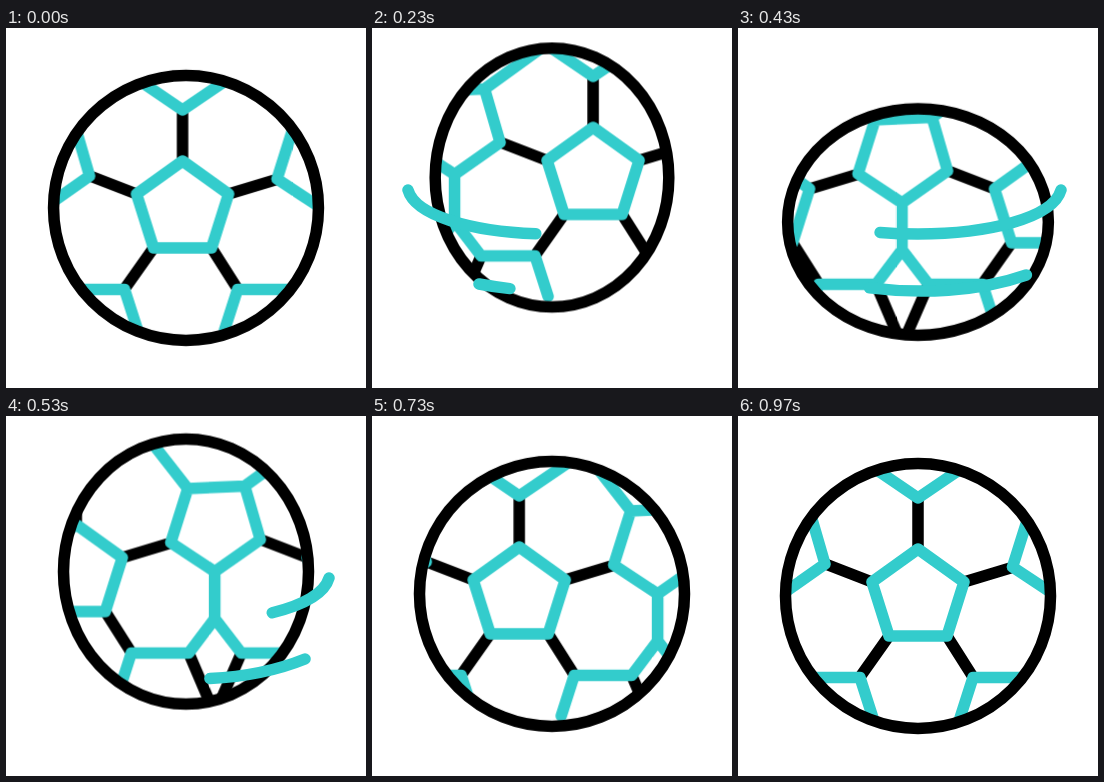
An HTML page without scripts for the animation above (1.67 s loop, 360 by 360 pixels).

```html
<!DOCTYPE html>
<html lang="en">
<head>
<meta charset="utf-8">
<title>Bouncing football</title>
<style>
  @property --head { syntax: "<length>"; inherits: false; initial-value: 0px; }
  @property --tail { syntax: "<length>"; inherits: false; initial-value: 0px; }

  :root { --loop: 1670ms; --lead: -5ms; --ease: cubic-bezier(.333, 0, .667, 1); }
  html, body { margin: 0; width: 100%; height: 100%; overflow: hidden; background: #fff; }
  svg { display: block; width: 100%; height: 100%; }

  path, .rim { fill: none; stroke-width: 11.5; stroke-linecap: round; stroke-linejoin: round; }
  .dark, .rim { stroke: #000; }
  .teal, .swoosh { stroke: #3cc; }

  .hop { animation: hop var(--loop) var(--ease) var(--lead) infinite; }
  .roll { animation: roll var(--loop) var(--ease) var(--lead) infinite; }
  .shell {
    animation: thin var(--loop) var(--ease) var(--lead) infinite,
               squash var(--loop) var(--ease) var(--lead) infinite;
  }

  .swoosh {
    stroke-dasharray: calc(var(--head) - var(--tail)) 300px;
    stroke-dashoffset: calc(-1 * var(--tail));
    animation: head var(--loop) var(--ease) var(--lead) infinite both,
               tail var(--loop) var(--ease) var(--lead) infinite both,
               show var(--loop) step-end var(--lead) infinite both;
  }
  .late { animation-delay: 66ms; }

  @keyframes hop {
    0%, 23.6%, 42%, 58%, 100% { transform: translateY(0); }
    11.4% { transform: translateY(-38.5px); }
    32% { transform: translateY(-24.5px); }
    50% { transform: translateY(-13px); }
  }
  @keyframes roll {
    0% { transform: translateX(-3.5px); }
    56%, 100% { transform: translateX(277px); }
  }
  @keyframes thin {
    0%, 23.6%, 42%, 100% { rx: 132.5px; }
    11.4% { rx: 114.5px; }
    32% { rx: 122.5px; }
  }
  /* the bottom edge stays put while the ball flattens */
  @keyframes squash {
    0%, 11.4%, 32%, 100% { ry: 132.5px; cy: 180px; }
    23.6% { ry: 108px; cy: 204.5px; }
  }
  @keyframes head {
    0%, 4.8% { --head: 0px; }
    24.8%, 100% { --head: 100px; }
  }
  @keyframes tail {
    0%, 17% { --tail: 0px; }
    38.7%, 100% { --tail: 100px; }
  }
  @keyframes show {
    0%, 39.4%, 100% { opacity: 0; }
    4.8% { opacity: 1; }
  }
</style>
</head>
<body>
<svg viewBox="0 0 360 360">
  <defs>
    <clipPath id="ball"><ellipse class="shell" cx="180" cy="180" rx="132.5" ry="132.5"/></clipPath>
    <path id="seams" class="dark" d="M180 133V82M226 166L274 151.5M134 166L87.5 148M209 220L235 261M151 220L122 261
      M292.5 261.5L314 312M345 261.5L323 312"/>
    <path id="panels" class="teal" d="M180 133L226 166L209 220H151L134 166Z
      M133 50L180 82L230 48
      M318.5 180L274.5 151L291.5 97L348.5 94.5L364 148Z
      M291.5 97L254 49M348.5 94.5L410 50
      M318.5 180V227L292.5 261.5H235L222 302
      M318.5 227L345 261.5H399L412 302"/>
  </defs>

  <g class="hop">
    <g clip-path="url(#ball)">
      <g class="roll">
        <use href="#seams" x="-554"/>
        <use href="#seams" x="-277"/>
        <use href="#seams"/>
        <use href="#panels" x="-554"/>
        <use href="#panels" x="-277"/>
        <use href="#panels"/>
      </g>
    </g>
    <ellipse class="rim shell" cx="180" cy="180" rx="132.5" ry="132.5"/>
  </g>

  <path class="swoosh" pathLength="100" d="M36 162C44 190 110 206 180 206S315 190 323 162"/>
  <path class="swoosh late" pathLength="100" d="M107 256C165 267 240 267 299 243"/>
</svg>
</body>
</html>
```
